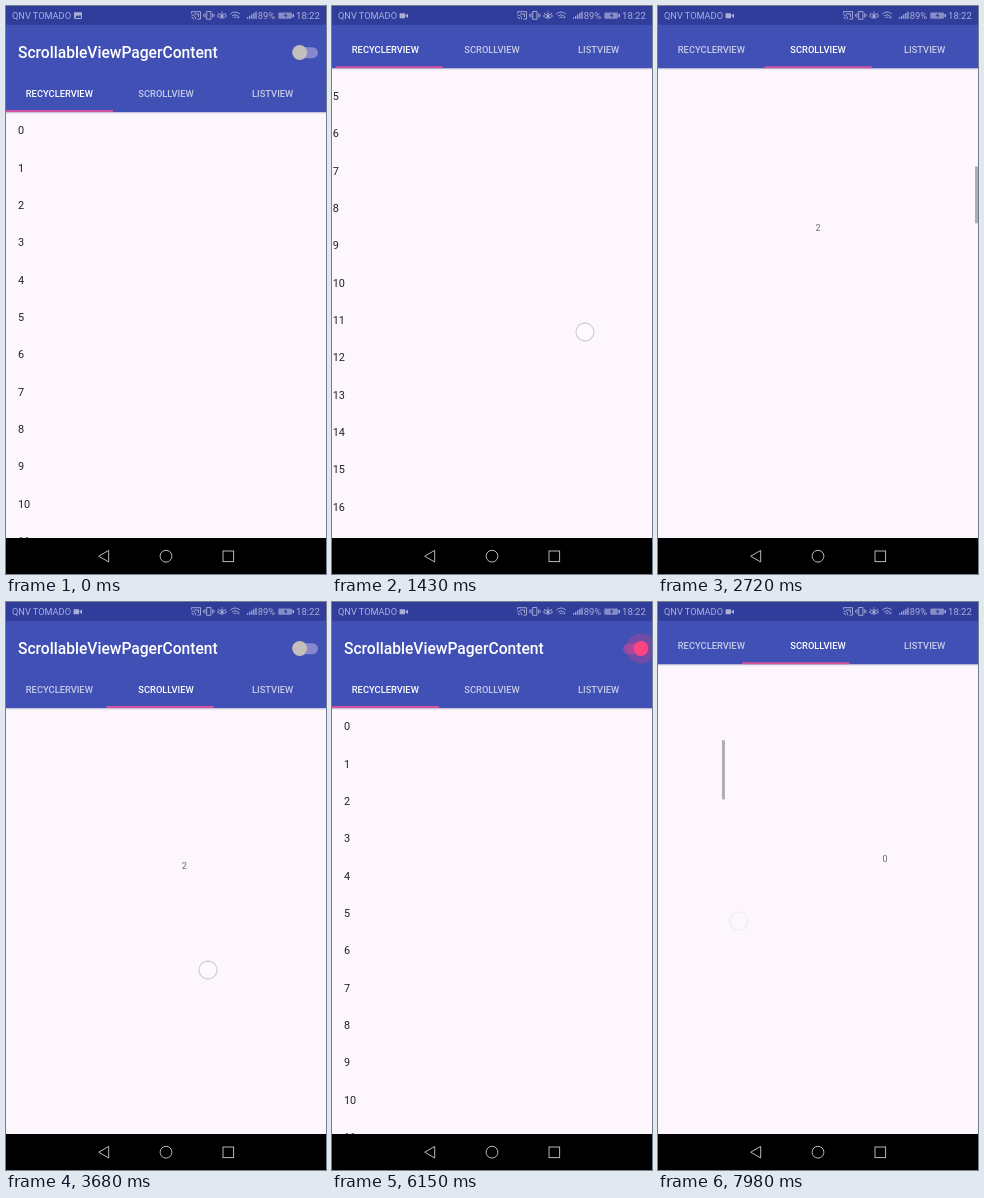
Animation of 320x568 px, one loop 8 s. Source, as an HTML page:

```html
<!DOCTYPE html>
<html lang="en">
<head>
<meta charset="utf-8">
<title>Scrollable pager</title>
<style>
  html, body { margin: 0; width: 100%; height: 100%; overflow: hidden; background: #000; }
  svg { display: block; width: 100%; height: 100%; font-family: Roboto, "Noto Sans", sans-serif; }
  .tab { font-size: 9.33px; font-weight: 500; fill: #fff; text-anchor: middle; }
  .row { font-size: 10.9px; fill: #212121; }
  .cell { font-size: 9px; fill: #6d686e; text-anchor: middle; }
  .bar { fill: #b1abb2; }
  .icon { fill: none; stroke: #abb0da; stroke-width: .9; }
  .solid { fill: #abb0da; }
</style>
</head>
<body>
<svg viewBox="0 0 320 568">
  <rect width="320" height="568" fill="#fdf7fd"/>

  <g id="listPage">
    <g id="rows"></g>
    <rect id="listBar" class="bar" x="317" width="3"/>
  </g>
  <g id="cellPage">
    <g id="cells"></g>
    <rect id="cellBar" class="bar" x="317" width="3"/>
  </g>

  <g id="header">
    <rect y="106" width="320" height="1" fill="#c9c5da"/>
    <rect y="107" width="320" height="1" fill="#ece6f0"/>
    <rect y="18" width="320" height="88" fill="#4050b4"/>
    <text x="12" y="52.4" font-size="15.62" font-weight="500" fill="#fff">ScrollableViewPagerContent</text>
    <rect id="switchTrack" x="291" y="41.2" width="21" height="11" rx="5.5"/>
    <circle id="switchGlow" cx="309" cy="46.5" r="15" fill="#ff4081"/>
    <circle id="switchThumb" cy="46.5" r="7.5"/>
    <g id="tabs"></g>
    <rect id="marker" y="104" width="107" height="2" fill="#d2529f"/>
  </g>

  <rect width="320" height="18.8" fill="#303d9b"/>
  <g class="solid">
    <text x="6" y="12.9" font-size="9.2">QNV TOMADO</text>
    <text x="251.8" y="13" font-size="9.4">89%</text>
    <text x="290" y="13" font-size="9.6">18:22</text>
    <g id="photo">
      <rect x="68" y="6.3" width="8" height="6.6" rx=".8"/>
      <path d="M69 12l2-3 1.5 1.8L74 8.6l1.4 3.4z" fill="#303d9b"/>
    </g>
    <path id="camera" d="M67.6 7.2h5.4v5h-5.4zM73 9.7l3-2.3v4.6z"/>
    <g id="signal"></g>
    <rect x="272.3" y="6.5" width="13.6" height="6.2" rx="1" opacity=".7"/>
    <rect x="286.5" y="8" width="1.5" height="3.2"/>
    <path d="M280.6 6.6l-3 3.4h2l-1 2.6 3.2-3.4h-2z" fill="#303d9b"/>
    <circle cx="216" cy="10" r="1.6"/>
    <path d="M231.4 10.6h2.2l-1.1 2.2z"/>
  </g>
  <g class="icon">
    <path d="M185.5 7.5V5.7h9v7.4h-3.2M185.5 9a4.3 4.3 0 0 1 4.2 4.2M185.5 11.2a2 2 0 0 1 2 2M188 8h4.5v3"/>
    <path d="M200.7 5.5h4.2v7.8h-4.2zM199 7.2v4.4M206.7 7.2v4.4M197.6 8.2v2.4M208.1 8.2v2.4"/>
    <path d="M211.3 10q4.7-4.4 9.4 0q-4.7 4.4-9.4 0M212 7l1 1M216 5.3v1.2M220 7l-1 1"/>
    <path d="M224.3 8q4.8-4 9.6 0M226 10q3.1-2.6 6 0M227.6 11.7q1.5-1.2 3 0"/>
  </g>

  <rect y="532" width="320" height="36" fill="#000"/>
  <g fill="none" stroke="#b8b8b8">
    <path d="M92.7 550.2l10-5.8v11.6z"/>
    <circle cx="160" cy="550.2" r="5.9"/>
    <rect x="217" y="545" width="10.6" height="10.6"/>
  </g>
  <circle id="touch" r="9" fill="#fff" fill-opacity=".3" stroke="#d5ced7" stroke-width="1.3"/>
</svg>
<script>
const LOOP = 8000, FOLD = 43.8, VIEW = 470, ROW = 37.33, CELL = 389, TAB = 320 / 3;
const $ = id => document.getElementById(id);

function set(el, attrs) {
  for (const k in attrs) el.setAttribute(k, attrs[k]);
}
function add(id, tag, attrs, text = "") {
  const el = document.createElementNS("http://www.w3.org/2000/svg", tag);
  set(el, attrs);
  el.textContent = text;
  return $(id).appendChild(el);
}
const shift = (id, x, y) => set($(id), { transform: `translate(${x} ${y})` });

for (let i = 0; i < 34; i++) add("rows", "text", { class: "row", x: 12, y: 22.2 + i * ROW }, i);
for (let i = 0; i < 10; i++) add("cells", "text", { class: "cell", x: 160, y: 197.8 + i * CELL }, i);
for (let i = 0; i < 5; i++) {
  const height = 1.6 + i * 1.4;
  add("signal", "rect", { x: 241 + i * 2.1, y: 12.8 - height, width: 1.2, height });
}
const tabs = ["RECYCLERVIEW", "SCROLLVIEW", "LISTVIEW"].map((name, i) =>
  add("tabs", "text", { class: "tab", x: (i + .5) * TAB, y: 90.9 }, name));

// Progress from a to b: linear, eased at both ends, or decelerating like a fling.
const ramp = (t, a, b) => Math.min(1, Math.max(0, (t - a) / (b - a)));
const glide = (t, a, b) => { const u = ramp(t, a, b); return u * u * (3 - 2 * u); };
const fling = (t, a, b, power) => 1 - (1 - ramp(t, a, b)) ** power;
const pulse = (t, a, b, fade) => ramp(t, a, a + fade) - ramp(t, b, b + fade);
const mix = (a, b, u) => `rgb(${a.map((c, i) => Math.round(c + (b[i] - c) * u))})`;

const UP = [0, -200], DOWN = [0, 62], LEFT = [-205, 0], RIGHT = [90, 0];
const swipe = (start, x, y, [dx, dy], time = 240) => ({ start, x, y, dx, dy, time });
const swipes = [
  swipe(520, 145, 519, UP, 410),
  swipe(1370, 286, 326, LEFT),
  swipe(2140, 160, 450, UP),
  swipe(2970, 160, 300, DOWN),
  swipe(3680, 202, 368, RIGHT),
  swipe(7190, 172, 394, UP),
  swipe(7680, 286, 319, LEFT)
];

function drawTouch(t) {
  const s = swipes.find(s => t >= s.start && t < s.start + s.time + 85);
  if (!s) return set($("touch"), { opacity: 0 });
  const end = s.start + s.time, u = glide(t, s.start, end);
  set($("touch"), { cx: s.x + s.dx * u, cy: s.y + s.dy * u, opacity: 1 - ramp(t, end, end + 85) });
}

function drawPage(name, x, top, scroll, total, alpha) {
  shift(name + "Page", x, 0);
  shift(name + "s", 0, top - scroll);
  set($(name + "Bar"), { y: top + scroll * VIEW / total, height: VIEW * VIEW / total, opacity: alpha });
}

function draw(t) {
  const fold = ramp(t, 520, 620) - ramp(t, 2990, 3170) + ramp(t, 7290, 7350);
  const page = glide(t, 1370, 1910) - glide(t, 3625, 4010) + glide(t, 7720, 8090);
  const top = 106 - FOLD * fold;

  // Flipping the switch sends both pages back to their start.
  const flipped = t >= 6000;
  const rowScroll = flipped ? 604 * fling(t, 7300, 7680, 2) : 177 * fling(t, 560, 1010, 3);
  const cellScroll = flipped ? 0 : 815 * fling(t, 2140, 2880, 4);
  const rowBar = pulse(t, 540, 1200, 60) + (t >= 7190 ? 1 : 0);
  shift("rows", 0, 0);
  drawPage("row", -320 * page, top, rowScroll, 100 * ROW, rowBar);
  drawPage("cell", 320 * (1 - page), top, cellScroll, 10 * CELL, pulse(t, 2140, 3400, 50));

  shift("header", 0, -FOLD * fold);
  set($("marker"), { x: TAB * page });
  const active = page > .6 ? 1 : 0;
  tabs.forEach((el, i) => set(el, { opacity: i === active ? 1 : .7 }));

  const on = fling(t, 5960, 6190, 2);
  set($("switchThumb"), { cx: 293.7 + 15.7 * on, fill: mix([196, 190, 188], [255, 64, 129], on) });
  set($("switchTrack"), { fill: mix([133, 137, 204], [134, 74, 166], on) });
  set($("switchGlow"), { opacity: .25 * pulse(t, 5900, 6270, 200) });

  set($("photo"), { opacity: t < 80 ? 1 : 0 });
  set($("camera"), { opacity: t < 80 ? 0 : 1 });
  drawTouch(t);
}

// Both pages share one naming scheme: page, items, bar.
$("listPage").id = "rowPage";
$("listBar").id = "rowBar";

const start = performance.now();
function tick(now) {
  draw(Math.max(0, now - start) % LOOP);
  requestAnimationFrame(tick);
}
draw(0);
requestAnimationFrame(tick);
</script>
</body>
</html>
```
